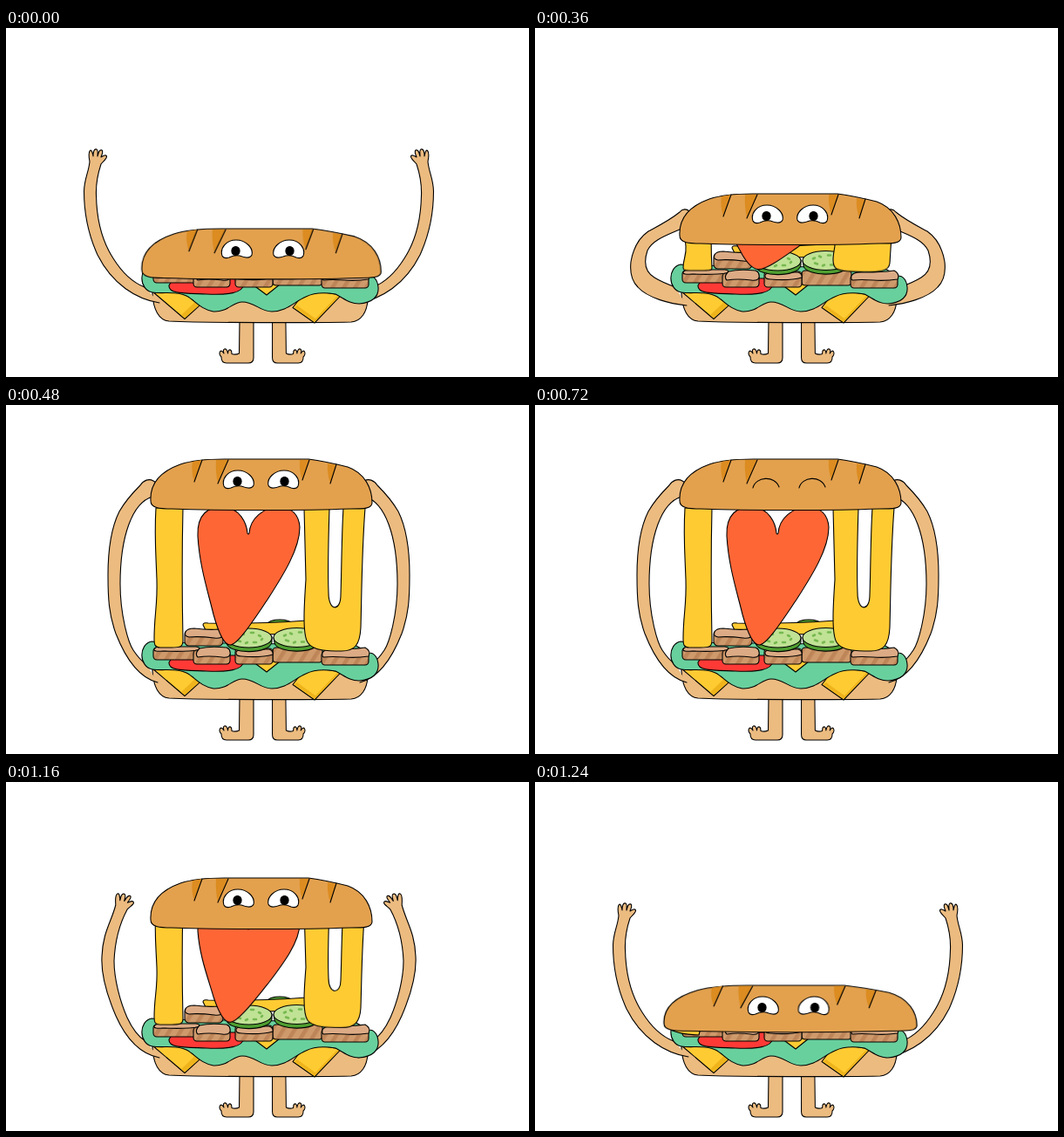
Recreate the animation shown at these times as an HTML page. Size 600 by 400 pixels, loop 1320 ms.

```html
<!DOCTYPE html>
<html lang="en">
<head>
<meta charset="utf-8">
<title>Sandwich</title>
<style>
html, body { margin: 0; width: 100%; height: 100%; overflow: hidden; background: #fff; }
svg { display: block; width: 600px; height: 400px; }

svg {
  --dough: #ecbb80;
  --crust: #e3a14e;
  --cheese: #ffcb33;
  stroke: #000; stroke-width: 1.1; stroke-linejoin: round; stroke-linecap: round;

  --raised: path("M176,315 C150,311 122,294 105,260 C95,238 89.5,212 89.5,187 C90,172 95,165 96,153 C95,148 94,143 96.5,140.5 C98,139 99,142 100,147 C100,142 101,138 104,139 C106,140 105,144 105,147 C106,143 107,139 110,140 C112,142 110,145 109,148 C112,146 115,145 115.5,147 C116,150 111,153 109,156 C106,165 103,180 103.5,192 C104,218 110,244 123,264 C133,280 146,292 159,297");
  --released: path("M176,316 C155,312 138,295 126,268 C114,240 109,218 110,200 C111,172 121,160 125.8,141 C125.7,135.8 124.7,129.5 128,128 C130,127.4 130.6,130.6 130.8,135.7 C131.6,130.7 133.3,127 136,128.5 C138,129.8 136.2,133.6 135.7,136.5 C138.3,133 140,129 142.8,130.7 C144.4,133 141,135.4 139.4,138.2 C142.8,136.8 146,135.3 146.5,138.4 C146,141.4 140.5,143.5 139,146.3 C130,163 125,183 124,205 C124,226 131,252 139,270 C145,283 152,292 160,297");
  --low: path("M174,317 C160,318 125,310 108,304 C96,299 91,294 91,287 C91,272 108,262 128,259 C142,256 155,257 164,256 C163,252 167,250 173,251 L182,265 L168,269 C150,268 130,270 121,277 C113,284 115,290 126,292 C138,296 150,299 162,301");
  --lift: path("M174,318 C155,316 130,310 118,297 C109,288 109,277 110,268 C113,250 120,240 130,233 C145,225 155,220 166,211 C169,207 174,207 177,210 L182,225 L166,231 C150,238 135,243 129,255 C124,270 127,280 137,286 C145,291 153,294 161,297");
  --high: path("M174,318 C150,312 135,285 126,262 C118,240 117,222 117,205 C117,180 124,162 133,151 C141,140 150,133 158,127 C163,124 169,123 176,127 L182,140 L168,146 C145,150 132,180 131,210 C131,240 140,272 146,281 C152,290 156,294 161,297");
  --top: path("M174,318 C150,312 135,285 126,262 C118,240 117,222 117,195 C117,160 122,138 130,122 C138,108 146,100 154,92 C158,86 164,84 169,87 L182,95 L168,105 C145,112 131,150 131,205 C131,240 140,272 146,281 C152,290 156,294 161,297");
}

.dough { fill: var(--dough); }
.crust { fill: var(--crust); }
.cheese { fill: var(--cheese); }
.shade { fill: #efb41c; stroke: none; }
.none { fill: none; }
.meat rect { fill: url(#grill); }
.meat path { fill: #dcab85; }
.letter path { vector-effect: non-scaling-stroke; }

.arm, .bun, .skin, .eyeL, .eyeR, .letter, .slot, .open, .lid, .shut, .sliver {
  animation: 1320ms step-end infinite;
}
.arm { animation-name: arm; }
.bun { animation-name: bun; }
.skin { animation-name: skin; transform-origin: 293px 0; }
.eyeL { animation-name: eyeL; }
.eyeR { animation-name: eyeR; }
.letter { --squash: .36; animation-name: letter; transform-origin: 0 278px; }
.heart { --squash: .47; }
.slot { animation-name: slot; }
.open { animation-name: open; }
.lid { animation-name: lid; }
.shut { animation-name: shut; }
.sliver { animation-name: sliver; }

@keyframes arm {
  0% { d: var(--raised); }
  18.18% { d: var(--low); }
  21.21% { d: var(--low); animation-timing-function: steps(2, end); }
  27.27% { d: var(--lift); animation-timing-function: steps(2, end); }
  33.33% { d: var(--high); }
  36.36% { d: var(--top); }
  87.87% { d: var(--released); animation-timing-function: steps(2, end); }
  93.93%, 100% { d: var(--raised); }
}
@keyframes bun {
  0%, 18.18% { transform: translateY(230px); }
  21.21% { transform: translateY(230px); animation-timing-function: steps(2, end); }
  27.27% { transform: translateY(190px); animation-timing-function: steps(2, end); }
  33.33% { transform: translateY(110px); }
  36.36% { transform: translateY(62px); }
  87.87% { transform: translateY(110px); animation-timing-function: steps(2, end); }
  93.93%, 100% { transform: translateY(233px); }
}
@keyframes skin {
  0% { transform: scale(1.08, .99); }
  18.18% { transform: scale(1, 1); }
  93.93%, 100% { transform: scale(1.142, .92); }
}
@keyframes eyeL {
  0% { transform: translate(-2px, 0); }
  18.18% { transform: translate(0, 0); }
  93.93%, 100% { transform: translate(-5px, 0); }
}
@keyframes eyeR {
  0% { transform: translate(6px, 0); }
  18.18% { transform: translate(0, 0); }
  93.93%, 100% { transform: translate(1.5px, 0); }
}
@keyframes letter {
  0% { transform: scaleY(.2); }
  21.21% { transform: scaleY(.2); animation-timing-function: steps(2, end); }
  27.27% { transform: scaleY(var(--squash)); animation-timing-function: steps(2, end); }
  33.33% { transform: scaleY(.84); }
  36.36% { transform: scaleY(1); }
  87.87% { transform: scaleY(.84); animation-timing-function: steps(2, end); }
  93.93%, 100% { transform: scaleY(.2); }
}
@keyframes slot { 0% { opacity: 0; } 30.3% { opacity: 1; } 93.93%, 100% { opacity: 0; } }
@keyframes open { 0% { opacity: 1; } 54.54% { opacity: 0; } 66.66%, 100% { opacity: 1; } }
@keyframes lid { 0% { opacity: 0; } 48.48% { opacity: 1; } 54.54%, 100% { opacity: 0; } }
@keyframes shut { 0% { opacity: 0; } 54.54% { opacity: 1; } 66.66%, 100% { opacity: 0; } }
@keyframes sliver { 0% { opacity: 0; } 93.93%, 100% { opacity: 1; } }
</style>
</head>
<body>
<svg viewBox="0 0 600 400">
  <defs>
    <pattern id="grill" width="11" height="11" patternUnits="userSpaceOnUse" patternTransform="rotate(32)">
      <rect width="11" height="11" fill="#cf9a6b" stroke="none"/>
      <rect width="4.5" height="11" fill="#bd8558" stroke="none"/>
    </pattern>
    <path id="leg" class="dough" d="M268,336 L267.5,373 Q263,375 259,373.5 Q259,368 256,369 Q254.5,370 254.5,373 Q253.5,367 250.5,368 Q248.5,369 250,373 Q247,368.5 245.5,371 Q244,374 247,377 Q247,384 253,384 L278,384 Q284,384 284,378 L284,336"/>
    <g id="eye">
      <path fill="#fff" d="M250,31 C247,22 255,13 266,13 C277,13 286,22 284,30 C282,35 275,33 270,31 Q264,30 258,33 Q252,35 250,31Z"/>
      <ellipse cx="265.5" cy="25.5" rx="4.6" ry="5"/>
    </g>
    <path id="lid" class="crust" d="M249.5,25 C251,17 257,12.5 266,12.5 C275,12.5 283,18 284.5,25 Q267,21 249.5,25Z"/>
    <path id="shut" class="none" d="M250,33 C253,20 275,18 280,32"/>
    <g id="slice">
      <path fill="#4f9e31" d="M252,267 L253,273 C256,286 302,286 305,272 L305,266Z"/>
      <ellipse cx="278.5" cy="267" rx="26.5" ry="11" fill="#c0e295"/>
      <path class="none" style="stroke: #76b84f; stroke-width: 2.6" d="M264,265l2,-1M271,262l2,1M281,261l3,0M290,264l2,1M266,270l3,1M275,273l2,-1M284,272l3,0M293,269l1,-1"/>
    </g>
  </defs>

  <use href="#leg"/>
  <use href="#leg" transform="translate(578.2) scale(-.96 1)"/>
  <path class="dough" d="M168,305 C169,322 175,335 187,336 C230,338 350,338 396,337 C408,336 414,325 415,312 L415,300 L168,300Z"/>

  <path class="arm dough"/>
  <g transform="translate(580) scale(-1 1)"><path class="arm dough"/></g>

  <path class="cheese" d="M168,302 L222,300 L222,318 L205,333.5Z"/>
  <path class="shade" d="M201,329 L220,311 L221.5,318 L205,332.5Z"/>
  <path class="cheese" d="M329,320.5 L354,338 L384.5,306 L345,300Z"/>
  <path class="shade" d="M331,320.5 L334,318 L355,333 L379,308 L383,307 L354,337Z"/>
  <path fill="#68d09d" d="M167,271 C152,274 152,300 168,303 C180,305 195,301 207,307 C217,312 222,322 238,325 C254,326 260,314 271,314 C286,314 291,325 305,325 C322,325 330,314 344,308 C354,303 366,303 378,305 C388,310 394,316 405,316 C420,315 428,308 427,297 C426,288 422,284 416,284 L400,275 L180,272Z"/>
  <path fill="#ff3a36" d="M187,295 C186,305 205,304 230,305 C255,306 271,304 273,294 L265,287 L192,287Z"/>
  <path class="cheese" d="M283,294 L314,294 L299,306Z"/>

  <ellipse cx="314" cy="250" rx="13" ry="4" fill="#4f9e31"/>
  <path class="cheese" d="M226,252 Q226,249 232,250 Q290,251 345,247 L350,262 L232,264Z"/>
  <g class="meat">
    <rect x="205" y="258" width="44" height="18" rx="5"/>
    <path d="M206,260 Q208,256 216,256 Q232,258 244,257 Q250,258 249,264 Q247,268 239,267 Q222,265 210,266 Q204,265 206,260Z"/>
    <rect x="169" y="278" width="54" height="14" rx="4"/>
    <path d="M170,280 Q172,276 182,277 L218,277 Q224,278 222,281 Q205,283 180,282 Q169,283 170,280Z"/>
    <rect x="215" y="281" width="42" height="16" rx="4"/>
    <path d="M222,279 Q234,276 253,278 Q258,280 257,286 Q256,290 248,289 Q232,287 220,289 Q216,285 222,279Z"/>
    <rect x="306" y="278" width="57" height="17" rx="4"/>
    <rect x="263" y="279" width="43" height="18" rx="4"/>
    <path d="M264,283 Q267,279 280,280 L302,280 Q307,282 306,286 Q292,290 270,288 Q263,288 264,283Z"/>
    <rect x="362" y="283" width="54" height="15" rx="4"/>
    <path d="M363,284 Q365,279 378,280 Q398,280 412,278 Q419,282 416,288 Q402,290 388,289 Q374,288 364,289 Q362,287 363,284Z"/>
  </g>
  <use href="#slice" x="55" y="-.5"/>
  <use href="#slice"/>

  <g class="letter">
    <path class="cheese" d="M172,118 L203,118 C202,160 202,220 203,270 C203,277 200,278 190,278 L177,278 C171,278 170,275 170,268 C170,240 174,230 173,200 C172,170 170,150 172,118Z"/>
    <path class="cheese" d="M342,118 L344,200 C342,230 340,262 346,272 C352,282 370,282 385,282 C400,282 406,275 407,255 C408,220 408,170 412,118Z"/>
    <path class="slot" fill="#fff" d="M371,118 C370,150 369,190 370,215 C370,237 384,237 384,218 C385,190 385,150 387,118"/>
  </g>
  <g class="letter heart">
    <path fill="#ff6636" d="M277,147 C276,135 268,118 250,117 C232,116 219,125 220,150 C222,185 232,215 238,240 C243,258 250,275 257,275 C266,275 285,245 300,223 C318,195 337,165 337,140 C336,126 328,117 312,117 C296,117 280,130 279,147 Q278,149 277,147Z"/>
  </g>

  <path class="sliver cheese" d="M152,281 Q160,289 188,290 L190,282Z"/>
  <g class="bun">
    <g class="skin">
      <path class="crust" d="M166,48 C165,30 175,15 200,6 C215,1 230,0 250,0 L347,0 C362,2 380,6 392,9 C412,16 420,34 420,50 C420,57 410,57 395,57 C340,59 250,59 190,57 C176,57 166,56 166,48Z"/>
      <path fill="#dc8c20" stroke="none" d="M214,3 L225,1 L216,26 Q212,14 214,3Z M241,1 L255,1 L243,28 Q240,14 241,1Z M337,1 L348,1 L340,24 Q336,12 337,1Z M369,5 L379,7 L372,28 Q368,16 369,5Z"/>
      <path class="none" d="M225,1 L216,26 M255,1 L243,28 M348,1 L340,24 M379,6 L372,28"/>
    </g>
    <g class="eyeL">
      <g class="open"><use href="#eye"/></g>
      <g class="lid"><use href="#lid"/></g>
      <g class="shut"><use href="#shut"/></g>
    </g>
    <g class="eyeR">
      <g transform="translate(585) scale(-1 1)">
        <g class="open"><use href="#eye"/></g>
        <g class="lid"><use href="#lid"/></g>
      </g>
      <g class="shut"><use href="#shut" x="53"/></g>
    </g>
  </g>
</svg>
</body>
</html>
```
